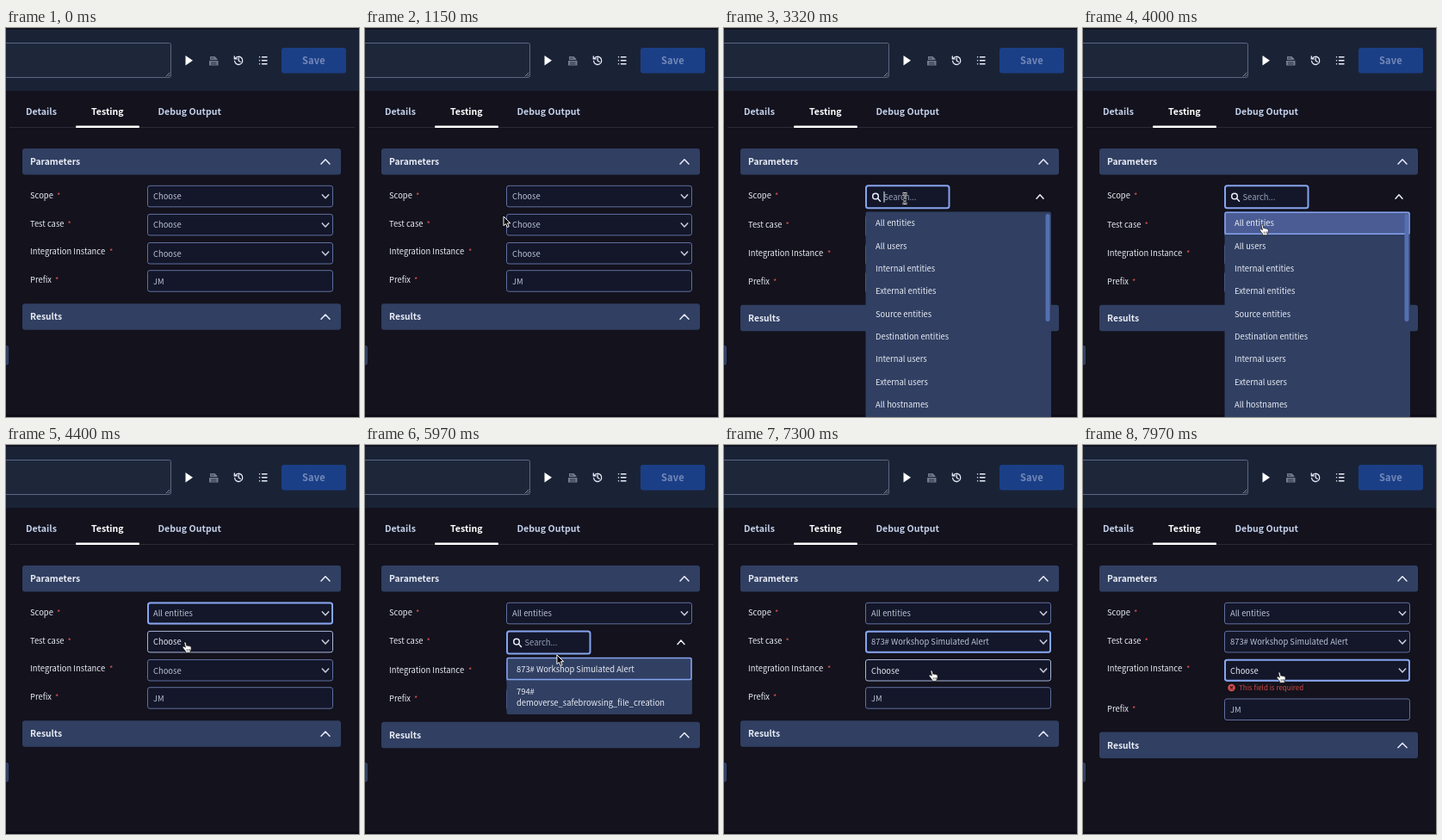
Recreate the animation shown at these times as an HTML page. Size 410 by 452 pixels, loop 8 s.

```html
<!DOCTYPE html>
<html lang="en">
<head>
<meta charset="utf-8">
<title>Parameters form</title>
<style>
  html, body { margin: 0; width: 100%; height: 100%; overflow: hidden; background: #13121d; }
  svg { display: block; width: 410px; height: 452px; }
  text {
    font: 9.4px "Noto Sans CJK JP", "Noto Sans CJK SC", "Noto Sans CJK", "Noto Sans", sans-serif;
    fill: #e9ecf4; white-space: pre;
  }
  .bold { font-weight: 700; font-size: 10.3px; }
  .tab { font-weight: 700; font-size: 10.6px; fill: #c3d0ea; }
  .save { font-weight: 700; font-size: 11px; fill: #7489b8; letter-spacing: .2px; }
  .star { fill: #d9534c; }
  .value { fill: #b9c1d6; }
  .hint { fill: #99a3bb; }
  .error { fill: #cf4842; font-size: 8px; }
  .line { fill: none; stroke: #e9edf8; stroke-width: 1.5; stroke-linecap: round; stroke-linejoin: round; }
  .box { fill: #14172a; stroke: #5f6f9e; }
  .ring { fill: none; stroke: #86a4ee; stroke-width: 2; }
  .panel { fill: #303f62; }
</style>
</head>
<body>
<svg id="stage" viewBox="0 0 410 452" xmlns="http://www.w3.org/2000/svg"></svg>
<script>
const LOOP = 8000;

// Moments of the interaction, in ms
const SCOPE_FOCUS = 2420, SCOPE_OPEN = 3320, SCOPE_PICK = 4340;
const CASE_OPEN = 5250, CASE_PICK = 7020, INST_FOCUS = 7330;

// Pointer moves: start, end, from, to, easing
const smooth = u => u * u * (3 - 2 * u);
const easeOut = u => 1 - (1 - u) * (1 - u);
const moves = [
  [850, 1150, [151, 408], [161, 219], easeOut],
  [1600, 1820, [161, 219], [210, 198], smooth],
  [3770, 4020, [211, 198], [208, 229], smooth],
  [5770, 6200, [208, 229], [222 + 19, 262], smooth],
  [7560, 7950, [241, 262], [228, 264], smooth]
];

const text = (x, y, s, cls = "", id = "") => `<text x="${x}" y="${y}" class="${cls}" id="${id}">${s}</text>`;
const rect = (x, y, w, h, r, attrs) => `<rect x="${x}" y="${y}" width="${w}" height="${h}" rx="${r}" ${attrs}/>`;
const line = (d, attrs = "") => `<path class="line" d="${d}" ${attrs}/>`;
const group = (id, ...parts) => `<g id="${id}">${parts.join("")}</g>`;
const chevron = (x, y, w, dy) => line(`M${x - w} ${y}l${w} ${dy}l${w} ${-dy}`);

const label = (y, s, starX) => text(28, y, s) + text(starX, y, "*", "star");

const field = (id, y, value, select = true) => group(id,
  rect(164.5, y, 215, 24.5, 2.5, 'class="box"'),
  rect(165, y + .3, 214, 24, 2.5, 'class="ring" opacity="0"'),
  text(171, y + 16, value, "value"),
  select ? `<g opacity=".85">${chevron(371, y + 10.5, 3.7, 4)}</g>` : "");

const section = (y, s) =>
  rect(19, y, 370, 30.5, 3, 'class="panel"') + text(28, y + 19, s, "bold") + chevron(371, y + 18, 5, -5.2);

const search = (id, y) => group(id,
  rect(165, y, 96.5, 26, 2.5, 'class="ring" style="fill:#14172a"'),
  `<circle cx="176" cy="${y + 12.2}" r="3.3" class="line"/>`,
  line(`M178.5 ${y + 14.8}l3 3.2`),
  text(185.5, y + 16.5, "Search...", "hint"),
  line(`M186 ${y + 7}v12`, 'style="stroke-width:1" data-caret="1"'),
  chevron(367, y + 15, 4, -4.5));

const scopes = ["All entities", "All users", "Internal entities", "External entities", "Source entities",
  "Destination entities", "Internal users", "External users", "All hostnames"];

const firstRow = y => rect(164.5, y, 215, 26, 1.5, 'fill="#566cab" data-hover="1"') +
  rect(165, y + .3, 214, 25, 1.5, 'class="ring" style="stroke-width:1.5"');

const header = [
  rect(0, 0, 410, 73, 0, 'fill="#1a2336"'),
  rect(0, 0, 410, 2, 0, 'fill="#12131f"'),
  rect(-6, 17.5, 197.5, 40, 2, 'fill="#1e273a" stroke="#5b6683"'),
  line("M186 56l4-4M188.7 56l1.5-1.5", 'style="stroke-width:.7" opacity=".7"'),
  '<path d="M208.5 32v11.5l8.5-5.75z" fill="#fff"/>',
  '<path d="M237 37v-4h5.5l3 3v1zM236 38h10.5v5.500h-10.500z" fill="#737b8d"/>',
  '<path d="M238 35h3.500M238 40h6.500M238 42h6.500" stroke="#1a2336" stroke-width=".8"/>',
  line("M266.2 35.500a4.600 4.600 0 1 1-.6 3M265.300 33v2.900h2.900M270.200 35v3l2 1.300", 'style="stroke-width:1.3"'),
  line("M297.500 33.700h5.500M297.500 37.700h5.500M297.500 41.700h5.500M294.500 33.700h.1M294.500 37.700h.1M294.500 41.700h.1", 'style="stroke-width:1.400"'),
  rect(320, 23, 75, 29.5, 3, 'fill="#1b3f87"'),
  text(344, 42, "Save", "save")
];

const tabs = [
  text(23, 101, "Details", "tab"),
  text(99, 101, "Testing", "tab").replace("<text", '<text style="fill:#fff"'),
  text(176.5, 101, "Debug Output", "tab"),
  rect(4, 115, 401, 1, 0, 'fill="#2b2b38"'),
  rect(81, 113.500, 74, 2.500, 1, 'fill="#fff"')
];

const hand = "M2.6 0C1.700 0 1.500.7 1.700 1.400L3 6.200 1.500 5.300C.4 4.700-.7 5.700-.1 6.600L3 10.500V12.200H8.800V10.500" +
  "C9.800 9 9.900 7.400 9.600 5.800 9.400 4.700 8.300 4.600 7.900 5.100 7.600 4.100 6.500 4 6.100 4.700 5.700 3.900 4.800 3.800 4.400 4.300L3.600 1C3.500.4 3.200 0 2.600 0Z";

const pointers =
  group("arrow", '<path d="M0 0V10.700L2.500 8.500 4.300 12.500 6.200 11.700 4.500 7.800H7.800Z" fill="#000" stroke="#fff" stroke-width="1" stroke-linejoin="round"/>') +
  group("hand", `<path d="${hand}" transform="translate(-2.600 0)" fill="#fff" stroke="#111" stroke-width=".7"/>` +
    '<path d="M2.200 8v2.500M4 8v2.500M5.600 8v2.500" stroke="#222" stroke-width=".6"/>') +
  group("beam", ...[["#fff", 2.4], ["#000", 1]].map(([c, w]) =>
    `<path d="M-2.500-6Q0-6 0-4.500Q0-6 2.500-6M0-4.500V4.500M-2.500 6Q0 6 0 4.500Q0 6 2.500 6M-1.500 1.500h3" fill="none" stroke="${c}" stroke-width="${w}"/>`));

document.getElementById("stage").innerHTML = [
  rect(0, 0, 410, 452, 0, 'fill="#13121d"'),
  ...header, ...tabs,
  rect(0, 449.5, 410, 2.500, 0, 'fill="#0d0a15"'),
  rect(-4, 369.500, 6.500, 21.500, 1.500, 'fill="#303f62" stroke="#43537c" stroke-width=".7"'),
  section(140, "Parameters"),
  label(197.5, "Scope", 59),
  field("scope", 183.3, "Choose"),
  group("caseRow", label(230.5, "Test case", 71.500), field("case", 216.4, "Choose")),
  group("instRow", label(263.3, "Integration Instance", 120), field("inst", 249.5, "Choose")),
  group("error",
    '<circle cx="172.500" cy="282" r="4.300" fill="#d64b45"/>',
    '<path d="M171 280.500l3 3m0-3l-3 3" stroke="#13121d" stroke-width="1.100"/>',
    text(181, 285, "This field is required", "error")),
  group("tail", label(296.4, "Prefix", 57), field("prefix", 281.7, "JM", false), section(320.300, "Results")),
  group("scopeOpen",
    search("scopeSearch", 183.3),
    rect(164.5, 213.500, 215.500, 245, 2, 'class="panel"'),
    firstRow(214),
    ...scopes.map((s, i) => text(176, 230.400 + i * 26.32, s)),
    rect(373.500, 216, 5, 125, 2.5, 'fill="#5470af"')),
  group("caseOpen",
    search("caseSearch", 216.4),
    rect(164.5, 247, 215.500, 66, 2, 'class="panel"'),
    firstRow(247.300),
    text(176, 263.500, "873# Workshop Simulated Alert"),
    text(176, 290, "794#"),
    text(176, 303, "demoverse_safebrowsing_file_creation")),
  group("pointer", pointers)
].join("");

const $ = id => document.getElementById(id);
const show = (el, on) => { el.style.display = on ? "" : "none"; };
const shift = (id, y) => $(id).setAttribute("transform", `translate(0 ${y})`);
const ramp = (t, a, b) => Math.min(1, Math.max(0, (t - a) / (b - a)));
const inside = ([x, y], l, top, r, bottom) => x >= l && x <= r && y >= top && y <= bottom;

function pointerAt(t) {
  let at = moves[0][2];
  for (const [a, b, from, to, ease] of moves) {
    if (t < a) break;
    const u = ease(ramp(t, a, b));
    at = from.map((v, i) => v + (to[i] - v) * u);
  }
  return at;
}

function paintField(id, value, focus, hover) {
  const [box, ring, label] = $(id).children;
  box.style.stroke = hover ? "#a9b6d8" : "";
  ring.setAttribute("opacity", focus);
  label.style.fill = hover ? "#e6e9f3" : "";
  if (label.textContent !== value) label.textContent = value;
}

function paintList(id, open, caret, ring, hover) {
  const el = $(id);
  show(el, open);
  show(el.querySelector("[data-caret]"), caret);
  const bg = el.querySelector("[data-hover]");
  bg.setAttribute("opacity", hover);
  bg.nextElementSibling.setAttribute("opacity", ring);
}

function render(t) {
  const scopeOpen = t >= SCOPE_OPEN && t < SCOPE_PICK;
  const caseOpen = t >= CASE_OPEN && t < CASE_PICK;
  const error = t >= INST_FOCUS;
  const at = pointerAt(t);
  const over = (top, bottom) => t >= 850 && inside(at, 164, top, 380, bottom);
  const overScope = !scopeOpen && over(183, 208);
  const overCase = !scopeOpen && !caseOpen && over(216, 241);
  const overInst = !scopeOpen && !caseOpen && over(249, 274);
  const overList = scopeOpen && over(213.5, 452) || caseOpen && over(247, 313);
  const typing = scopeOpen && inside(at, 164, 183, 262, 210) || caseOpen && inside(at, 164, 216, 262, 243);

  paintField("scope", t < SCOPE_PICK ? "Choose" : "All entities",
    t < SCOPE_PICK ? ramp(t, SCOPE_FOCUS, 2600) : 1 - ramp(t, CASE_OPEN, 5430), overScope);
  paintField("case", t < CASE_PICK ? "Choose" : "873# Workshop Simulated Alert",
    t < CASE_PICK ? 0 : 1 - ramp(t, INST_FOCUS, 7480), overCase);
  paintField("inst", "Choose", ramp(t, INST_FOCUS, 7480), overInst);
  show($("scope"), !scopeOpen);
  show($("case"), !caseOpen);
  show($("error"), error);

  const nudge = scopeOpen || caseOpen ? 1.4 : 0;
  shift("caseRow", scopeOpen ? nudge : 0);
  shift("instRow", nudge);
  shift("tail", error ? 13.3 : nudge);

  const blink = start => t >= start && Math.floor((t - start) / 500) % 2 === 0;
  paintList("scopeOpen", scopeOpen, blink(SCOPE_OPEN), ramp(t, 3340, 3420), ramp(t, 3900, 4050));
  paintList("caseOpen", caseOpen, blink(5370), ramp(t, 5270, 5350), ramp(t, 6060, 6210));

  const shape = typing ? "beam" : overList || overScope || overCase || overInst ? "hand" : "arrow";
  for (const id of ["arrow", "hand", "beam"]) show($(id), id === shape);
  show($("pointer"), t >= 850);
  $("pointer").setAttribute("transform", `translate(${at[0]} ${at[1]})`);
}

const start = performance.now();
function tick() {
  render((performance.now() - start) % LOOP);
  requestAnimationFrame(tick);
}
tick();
</script>
</body>
</html>
```
